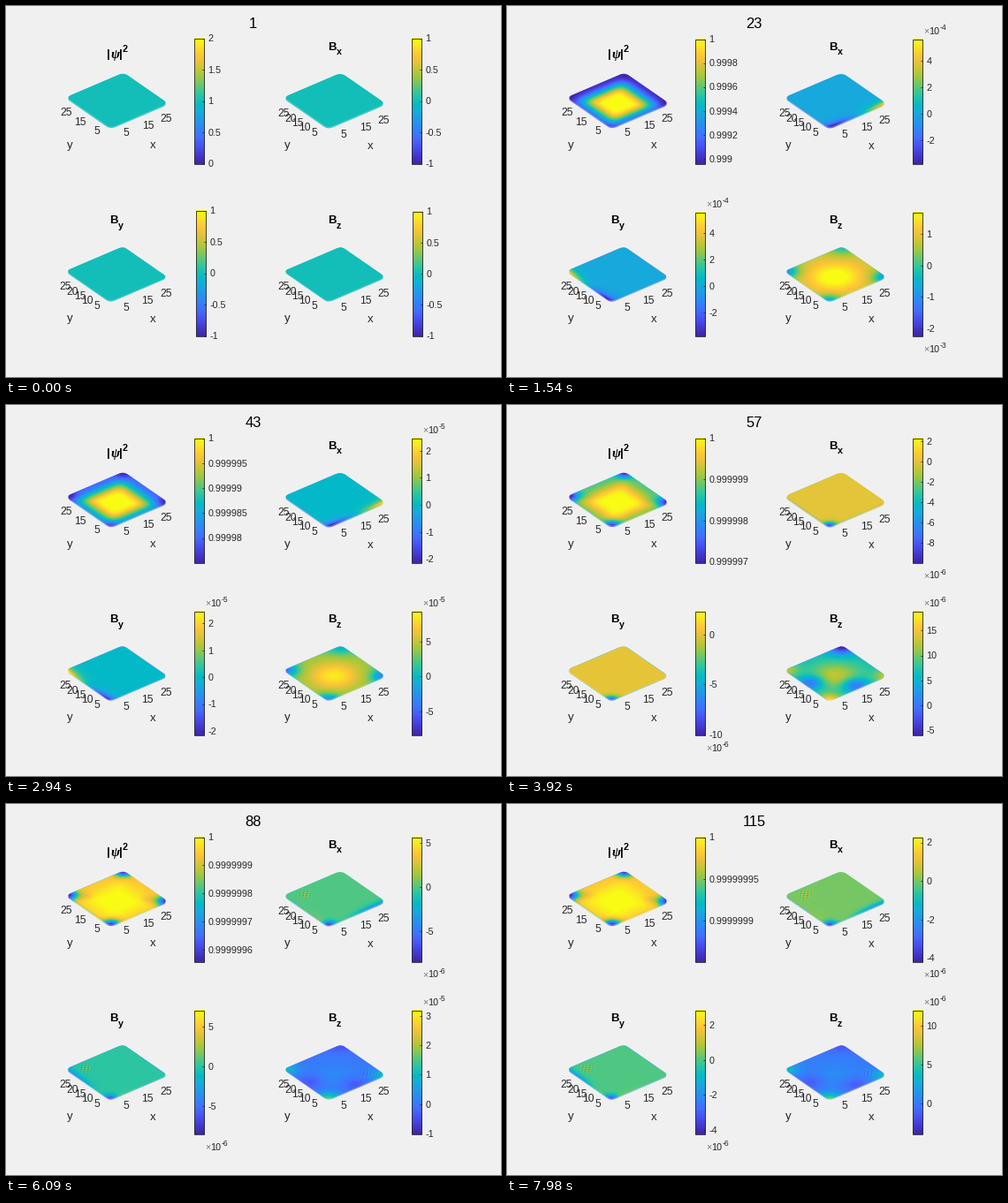
Animation, 560 px wide and 420 px high, one loop 8 s. Source, as a matplotlib script:

```python
import math

import matplotlib.pyplot as plt
import numpy as np
from matplotlib.animation import FuncAnimation
from matplotlib.collections import LineCollection
from matplotlib.colors import LinearSegmentedColormap
from matplotlib.patches import PathPatch, Rectangle
from matplotlib.path import Path
from matplotlib.transforms import Affine2D

W, H, DPI = 560, 420, 100
STEPS, LOOP = 115, 8000
N = 32  # cells along each side of a slab
INK = "#262626"

PARULA = LinearSegmentedColormap.from_list("parula_like", [
    (0, "#3e26a8"), (.07, "#4439d0"), (.14, "#4752f4"), (.21, "#436eff"),
    (.286, "#2e87f7"), (.43, "#12b1d6"), (.465, "#03b9c8"), (.5, "#12beb9"),
    (.57, "#37c897"), (.71, "#abc739"), (.857, "#fec338"), (1, "#f9fb15")])

# Key points of the field extremes, log-interpolated; before them a pure decay.
KEYS = [22, 42, 56, 73, 100, 114]
SIDE_TOP = [5.6e-4, 2.46e-5, 2.3e-6, 3.25e-6, 9.3e-6, 2.28e-6]
SIDE_LOW = [3.75e-4, 2.13e-5, 9.92e-6, 7.6e-6, 9.2e-6, 4.2e-6]
Z_TOP = [1.7e-3, 9.4e-5, 1.89e-5, 3.42e-5, 2.98e-5, 1.2e-5]
Z_LOW = [2.25e-3, 8.4e-5, 6e-6, 5e-6, 1.94e-5, 3.98e-6]
DECAY = .155

axis = (np.arange(N) + .5) / N
U, V = np.meshgrid(axis, axis)
CHECK = np.where(np.add.outer(np.arange(N), np.arange(N)) % 2, 1.0, -1.0)


def bump(u, v, s):
    return np.exp(-((U - u) ** 2 + (V - v) ** 2) / (2 * s * s))


def smooth(a, lo, hi):
    t = np.clip((a - lo) / (hi - lo), 0, 1)
    return t * t * (3 - 2 * t)


def mix(shapes, weights):
    return sum(w * s for w, s in zip(weights, shapes))


# Density: a square plateau and four corner pits.
RADIAL = (np.abs(2 * U - .88) ** 6 + np.abs(2 * V - .88) ** 6) ** (1 / 6)
RIM = smooth(RADIAL, .27, 1.1)
PITS = sum(bump(u, v, .09) for u in (.02, .98) for v in (.02, .98))
PITS += .1 * (bump(.2, .82, .07) + bump(.82, .2, .07))

# In-plane field along its front edge: slope, corner, far end, flank.
SIDE = [(U - .5) * np.exp(-V / .055), bump(0, 0, .08),
        smooth(U, .25, .8) * np.exp(-V / .04),
        smooth(V, .03, .12) * np.exp(-V / .2) * np.exp(-U / .04)]
SIDE_RIPPLE = CHECK * bump(.22, .84, .06)

# Vertical field: base, centre, top, left and right, bottom, flanks.
VERTICAL = [1, bump(.45, .45, .24), bump(1, 1, .15),
            bump(0, 1, .13) + bump(1, 0, .13), bump(0, 0, .12),
            bump(.09, .52, .12) + bump(.52, .09, .12)]
Z_RIPPLE = CHECK * (bump(.83, .19, .06) + .4 * bump(.97, .04, .04))
Z_EARLY = np.array([.2, .28, -.25, -.45, -.4, 0])
Z_LATE = np.array([0, .05, -.1, .24, .4, -.09])
Z_TURN = np.array([.27, .2, -.45, 0, 0, -.24])


def extreme(values, i):
    lead = DECAY * max(0, KEYS[0] - i)
    return math.exp(np.interp(i, KEYS, np.log(values)) + lead)


def limits(kind, i):
    if kind == "psi":
        fast = 1.037e-3 * math.exp(-.192 * (i - 22))
        slow = 2.6e-7 * math.exp(-.04 * (i - 100))
        return (1 - fast - slow, 1) if i else (0, 2)
    if i == 0:
        return -1, 1
    if kind == "z":
        return -extreme(Z_LOW, i), extreme(Z_TOP, i)
    lo, hi = -extreme(SIDE_LOW, i), extreme(SIDE_TOP, i)
    if kind == "y":
        lo, hi = lo * 1.01, hi * (1 + .25 * smooth(i, 56, 73))
    return lo, hi


def field(kind, i, lo, hi):
    """Field on the grid, scaled to 0..1 of the colour range."""
    if i == 0:
        return np.full((N, N), .5)
    if kind == "psi":
        s = smooth(i, 30, 72)
        return 1 - (.95 - .82 * s) * RIM - (.05 + .8 * s) * PITS
    zero = -lo / (hi - lo)
    late, settled = smooth(i, 42, 56), smooth(i, 56, 73)
    ripple = .45 * math.exp(-((i - 100) / 20) ** 2)
    if kind == "z":
        turn = math.exp(-((i - 57) / 7) ** 2)
        w = (1 - late) * Z_EARLY + late * Z_LATE + turn * Z_TURN
        return zero + mix(VERTICAL, w) + ripple * Z_RIPPLE
    w = [1.4 * (1 - late), -zero * late, -.6 * zero * settled, .25 * settled]
    f = mix(SIDE, w)
    return zero + (f if kind == "x" else f.T) + ripple * SIDE_RIPPLE


def ticks(lo, hi, height, gap):
    raw = (hi - lo) * gap / height
    power = math.floor(math.log10(raw))
    m = next(m for m in (1, 2, 5, 10) if m * 10.0 ** power >= raw)
    if m == 10:
        m, power = 1, power + 1
    step = m * 10.0 ** power
    first, last = math.ceil(lo / step - .001), math.floor(hi / step + .001)
    return [k * m for k in range(first, last + 1)], power


def plain(n, power):
    s = f"{n * 10.0 ** power:.{max(0, -power)}f}"
    return s.rstrip("0").rstrip(".") if "." in s else s


fig = plt.figure(figsize=(W / DPI, H / DPI), dpi=DPI, facecolor="#f0f0f0")
ax = fig.add_axes([0, 0, 1, 1])
ax.set_xlim(0, W)
ax.set_ylim(H, 0)
ax.axis("off")


def text(x, y, s, px, ha="center", color=INK, **kw):
    """Text whose digits are centred vertically on y."""
    kw.setdefault("family", "Liberation Sans")
    return ax.text(x - .5, y + .36 * px, s, fontsize=px * 72 / DPI, ha=ha,
                   va="baseline", color=color, **kw)


def slab_path():
    c = np.array([(0, 0), (1, 0), (1, 1), (0, 1)], float)
    pts, codes = [], []
    for k in range(4):
        p, prev, nxt = c[k], c[k - 1], c[(k + 1) % 4]
        pts += [p + .1 * (prev - p), p, p + .1 * (nxt - p)]
        codes += [Path.LINETO if k else Path.MOVETO, Path.CURVE3, Path.CURVE3]
    return Path(pts + [pts[0]], codes + [Path.CLOSEPOLY])


class Panel:
    def __init__(self, kind, dx, dy, bar_x, bar_top, bar_low, shift):
        self.kind, self.shift = kind, shift
        self.bar = bar_x, bar_top, bar_low
        self.layers = [self.layer(dx, dy + 1, .75, 2), self.layer(dx, dy - .6, 1, 3)]
        ramp = np.linspace(0, 1, 256)[:, None]
        self.ramp = ax.imshow(ramp, cmap=PARULA, aspect="auto", origin="lower", zorder=2)
        self.box = ax.add_patch(Rectangle((0, 0), 1, 1, fill=False, ec=INK, lw=.6, zorder=4))
        self.marks = ax.add_collection(LineCollection([], colors=INK, linewidths=.6, zorder=4))
        self.labels = [text(0, 0, "", 10.8, "left") for _ in range(12)]
        self.exp = [text(0, 0, "×", 10.8, "left", "#777777"),
                    text(0, 0, "10", 10.8, "left"), text(0, 0, "", 8.6, "left")]
        self.title(dx, dy)
        self.axis_labels(dx, dy)

    def layer(self, dx, dy, alpha, z):
        place = Affine2D.from_values(65.5, -28, -50.5, -35, 118 + dx, 138.7 + dy)
        tr = place + ax.transData
        im = ax.imshow(np.zeros((N, N)), cmap=PARULA, vmin=0, vmax=1,
                       extent=(0, 1, 0, 1), origin="lower", aspect="auto",
                       interpolation="bilinear", alpha=alpha, zorder=z, transform=tr)
        im.set_clip_path(PathPatch(slab_path(), transform=tr))
        return im

    def title(self, dx, dy):
        bold = dict(color="black", weight="bold")
        if self.kind != "psi":
            text(118.3 + dx, 45.2 + dy, "B", 13.2, "left", **bold)
            text(128 + dx, 51.3 + dy, self.kind, 10.6, "left", **bold)
            return
        for x in (116.5, 130.5):
            text(x, 53, "|", 13.2, **bold)
        text(123.5, 53.5, "ψ", 15, color="black", family="Liberation Serif",
             style="italic", weight="bold")
        text(135.5, 48, "2", 10.6, **bold)

    def axis_labels(self, dx, dy):
        psi = self.kind == "psi"
        drop = 0 if psi else 1
        for n in (5, 15, 25):
            text(133.3 + 2.1 * (n - 5) + dx, 143 - .8 * (n - 5) + drop + dy,
                 str(n), 12, "left")
        for n in range(5, 26, 10 if psi else 5):
            text(107 - 1.6 * (n - 5) + dx, 141 - 1.07 * (n - 5) + drop + dy,
                 str(n), 12, "right")
        text(166.7 + dx, 156.5 + dy, "x", 13.2)
        text(73 + dx, 156 + dy, "y", 13.2)

    def update(self, i):
        lo, hi = limits(self.kind, i)
        data = np.clip(field(self.kind, i, lo, hi), 0, 1)
        for im in self.layers:
            im.set_data(data)

        x, top, low = self.bar
        if i == 0:
            x, top = x + self.shift, top - max(1, self.shift)
        self.ramp.set_extent((x, x + 12, low, top - 1))
        self.box.set_bounds(x, top, 11, low - top)

        nums, power = ticks(lo, hi, low - top, 25 if self.kind == "psi" else 22.9)
        biggest = max(abs(n) for n in nums) * 10.0 ** power
        scaled = self.kind != "psi" and biggest < .0099
        segs = []
        for label in self.labels:
            label.set_visible(False)
        for label, n in zip(self.labels, nums):
            y = low - .5 - (n * 10.0 ** power - lo) / (hi - lo) * (low - top)
            segs.append([(x + 9, y), (x + 11, y)])
            label.set_visible(True)
            label.set_text(str(n) if scaled else plain(n, power))
            label.set_position((x + 15.4, y + 3.9))
        self.marks.set_segments(segs)

        ey = low + 13.5 if -lo > hi else top - 10.5
        for t, ox, oy in zip(self.exp, (11.8, 18.2, 30.3), (4, 4, -.6)):
            t.set_visible(scaled)
            t.set_position((x + ox, ey + oy))
        self.exp[2].set_text(str(power))


panels = [Panel("psi", 0, 0, 213, 38, 179, 0),
          Panel("x", 246, .3, 459, 38, 179, 0),
          Panel("y", -.3, 196.5, 213, 234, 374, 2),
          Panel("z", 246, 196.5, 459, 234, 374, 1)]
counter = text(280, 19.5, "", 16.5, color="black")
ax.set_xlim(0, W)
ax.set_ylim(H, 0)


def draw(i):
    counter.set_text(str(i + 1))
    for p in panels:
        p.update(i)
    return []


anim = FuncAnimation(fig, draw, frames=STEPS, interval=LOOP / STEPS,
                     init_func=lambda: draw(0), repeat=True, repeat_delay=0, blit=False)
plt.show()
```
